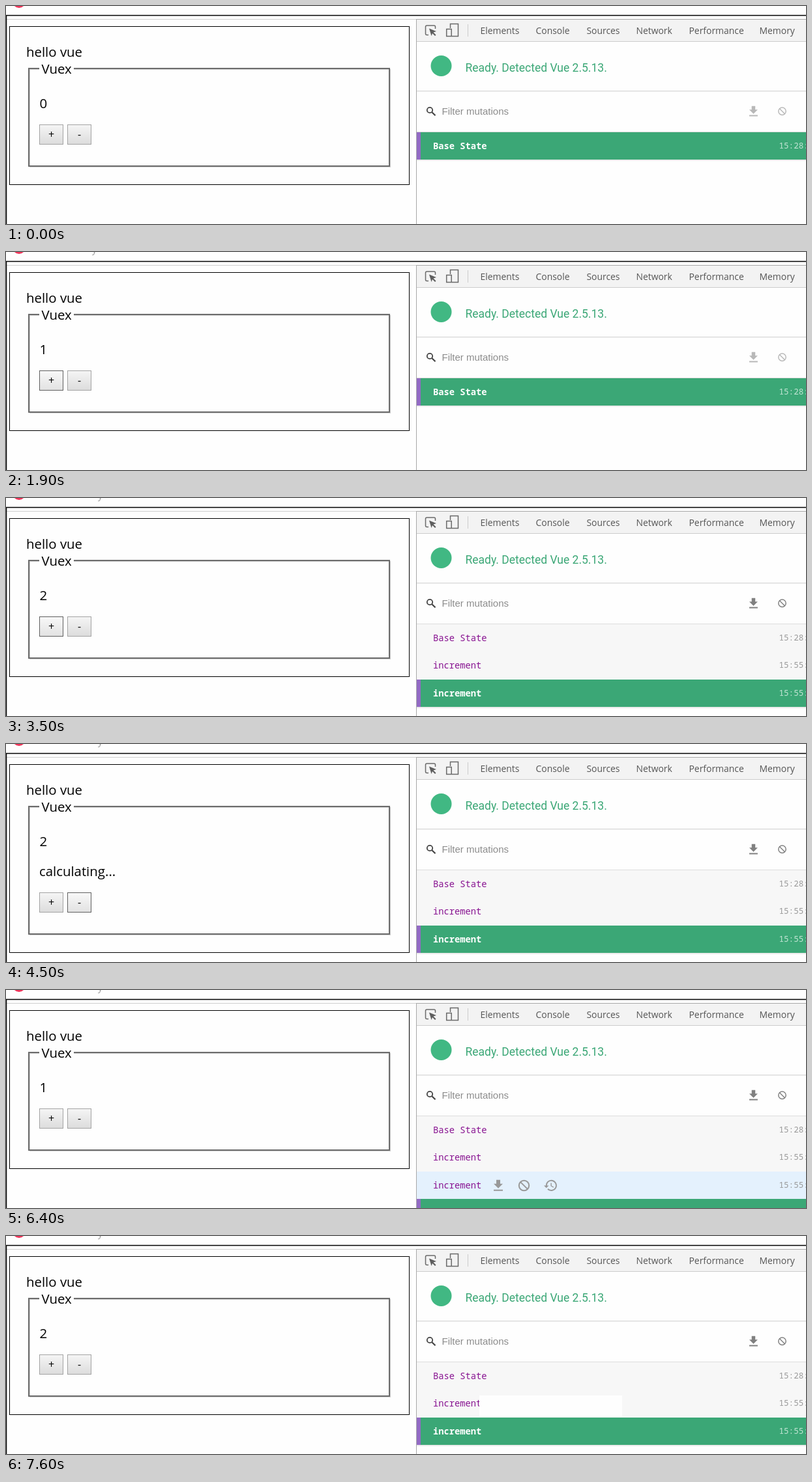
Recreate the animation shown at these times as an HTML page. Size 1227x335 px, loop 8 s.

```html
<!DOCTYPE html>
<html lang="en">
<head>
<meta charset="utf-8">
<title>Vuex counter with devtools</title>
<style>
  html, body { margin: 0; width: 100%; height: 100%; overflow: hidden; background: #fefefe; }
  svg { display: block; }
  text { white-space: pre; }
  .page text { font: 20.4px "Open Sans", sans-serif; }
  .button rect { fill: url(#face); stroke: #a3a3a3; }
  .button.hover rect { fill: url(#lit); stroke: #606060; }
  .button.down rect { fill: #dcdcdc; }
  .page .button text { font-size: 16px; text-anchor: middle; }
  .tabs { font: 13.9px "Open Sans", sans-serif; fill: #555; }
  .row .bg { fill: #f7f7f7; }
  .row .mark, .row .shade { visibility: hidden; }
  .row text { font: 13.75px "Noto Sans Mono", monospace; fill: #881391; }
  .row .time { font-size: 12.6px; fill: #999; }
  .row .tools { visibility: hidden; color: #999; }
  .row.hover .bg { fill: #e4f1fd; }
  .row.hover .tools { visibility: visible; }
  .row.active .bg { fill: #3ba776; }
  .row.active .mark, .row.active .shade { visibility: visible; }
  .row.active text { fill: #fff; }
  .row.active .name { font-weight: 600; }
  .row.active .time { fill: #c5e5d6; }
  .row.active .tools { color: #b4dfcb; }
</style>
</head>
<body>
<svg width="1227" height="335" viewBox="0 0 1227 335">
  <defs>
    <linearGradient id="face" x2="0" y2="1"><stop stop-color="#f5f5f5"/><stop offset="1" stop-color="#dcdcdc"/></linearGradient>
    <linearGradient id="lit" x2="0" y2="1"><stop stop-color="#f8f8f8"/><stop offset="1" stop-color="#e2e2e2"/></linearGradient>
    <path id="save" fill="currentColor" d="M19 9h-4V3H9v6H5l7 7 7-7zM5 18v2h14v-2z"/>
    <g id="ban" fill="none" stroke="currentColor" stroke-width="2"><circle r="7.7"/><path d="M-5.4-5.4 5.4 5.4"/></g>
    <path id="history" fill="currentColor" d="M13 3a9 9 0 0 0-9 9H1l4 4 4-4H6a7 7 0 1 1 2.06 4.94l-1.42 1.42A9 9 0 1 0 13 3zm-1 5v5l4.28 2.54.72-1.21-3.5-2.08V8z"/>
  </defs>

  <circle cx="20" cy="-7" r="10" fill="#f0355a"/>
  <text id="title" y="1" font-family="Open Sans, sans-serif" font-size="14" fill="#999">y</text>
  <path d="M0 20.5H629" stroke="#d0d0d0"/>
  <path d="M0 14.5H1227M.5 14V335" stroke="#000" stroke-width="1.5" fill="none"/>

  <g class="page">
    <rect id="frame" x="5.5" y="31.5" width="613" fill="none" stroke="#000"/>
    <rect id="light" x="36.5" y="97.5" width="553" fill="none" stroke="#cfcfcf"/>
    <rect id="fieldset" x="35" y="96" width="553" fill="none" stroke="#6c6c6c" stroke-width="2"/>
    <rect x="51" y="93" width="53" height="8" fill="#fefefe"/>
    <text x="31" y="78">hello vue</text>
    <text x="54.5" y="104">Vuex</text>
    <text id="count" x="51.5" y="157"></text>
    <text id="busy" x="51" y="203">calculating...</text>
    <g id="buttons">
      <g class="button" id="plus"><rect x="51.5" y="182.5" width="36" height="30"/><text x="69.5" y="203">+</text></g>
      <g class="button" id="minus"><rect x="94.5" y="182.5" width="36" height="30"/><text x="112.5" y="203">-</text></g>
    </g>
  </g>

  <g id="devtools">
    <rect x="630" y="21" width="597" height="33" fill="#f3f3f3"/>
    <path d="M629.5 20V335M629 20.5H1227" stroke="#a8a8a8" fill="none"/>
    <path d="M630 54.5H1227M708.5 28V47" stroke="#ccc" fill="none"/>
    <g fill="none" stroke="#6a6a6a" stroke-width="1.5">
      <path d="M648 44.5H645.5Q643.5 44.5 643.5 42.5V32Q643.5 30 645.5 30H656.500Q658.500 30 658.500 32V35"/>
      <path d="M681.500 34V27.500H693.500V46.500H684"/>
      <rect x="675.700" y="35.500" width="7.500" height="11"/>
    </g>
    <path d="M649 34.500 660 39 655.500 40.500 659.500 44.500 658 46 654 42 652.500 46z" fill="#5e5e5e"/>
    <g class="tabs">
      <text x="727.5" y="43">Elements</text>
      <text x="812.5" y="43">Console</text>
      <text x="890.5" y="43">Sources</text>
      <text x="966.5" y="43">Network</text>
      <text x="1047.500" y="43">Performance</text>
      <text x="1155.500" y="43">Memory</text>
    </g>
    <circle cx="667.5" cy="92" r="16" fill="#41b883"/>
    <text x="704.500" y="101" font-family="Roboto, sans-serif" font-size="17.500" fill="#3ba776">Ready. Detected Vue 2.5.13.</text>
    <path d="M630 130.500H1227" stroke="#dadada"/>
    <path d="M630 131.500H1227" stroke="#f0f0f0"/>
    <g fill="none" stroke="#444" stroke-width="1.800"><circle cx="650" cy="160" r="4.200"/><path d="M653.300 163.300 658.500 168.300" stroke-width="2.200"/></g>
    <text x="668.500" y="167" font-family="Liberation Sans, Arial, sans-serif" font-size="15" fill="#8c8c8c">Filter mutations</text>
    <g id="actions">
      <use href="#save" transform="translate(1135.400 151) scale(.92)"/>
      <use href="#ban" transform="translate(1190.500 161.700) scale(.74)"/>
    </g>
    <path d="M630 193.500H1227" stroke="#dcdcdc"/>
    <g id="rows"></g>
    <rect id="tip" x="726" y="245" width="219" height="32" fill="#fefefe"/>
  </g>
</svg>
<script>
const LOOP = 8000;
const $ = id => document.getElementById(id);
const tops = [194, 236, 279, 321, 364];

$('rows').innerHTML = ['Base State', 'increment', 'increment', 'decrement'].map((name, i) => `
  <g class="row" transform="translate(0 ${tops[i]})">
    <rect class="bg" x="630" width="597" height="${tops[i + 1] - tops[i]}"/>
    <rect class="mark" x="630" width="6" height="${tops[i + 1] - tops[i]}" fill="#926bc4"/>
    <rect class="shade" x="630" y="${tops[i + 1] - tops[i]}" width="597" height="2" fill="#ececec"/>
    <text class="name" x="655" y="26">${name}</text>
    <text class="time" x="1185.500" y="25">${i ? '15:55:' : '15:28:'}</text>
    <g class="tools">
      <use href="#save" x="743" y="9.700"/>
      <use href="#ban" x="794.500" y="21.500"/>
      <use class="travel" href="#history" transform="translate(824 10) scale(.95)"/>
    </g>
  </g>`).join('');
const rows = [...document.querySelectorAll('.row')];

// Value of the last [time, value] step that has been reached.
const at = (t, steps) => steps.reduce((value, [start, next]) => t >= start ? next : value, null);
const within = (t, from, to) => t >= from && t < to;
const show = (el, on) => el.style.display = on ? '' : 'none';

function render(t) {
  const busy = within(t, 1400, 1900) || within(t, 2900, 3500) || within(t, 4500, 5000);
  const grow = busy ? 46 : 0;
  $('count').textContent = at(t, [[0, 0], [1900, 1], [3500, 2], [5000, 1], [7400, 2]]);
  show($('busy'), busy);
  $('frame').setAttribute('height', 243 + grow);
  $('fieldset').setAttribute('height', 150 + grow);
  $('light').setAttribute('height', 150 + grow);
  $('buttons').setAttribute('transform', `translate(0 ${grow})`);

  $('plus').classList.toggle('hover', within(t, 1000, 3900));
  $('plus').classList.toggle('down', within(t, 1300, 1400) || within(t, 2800, 2900));
  $('minus').classList.toggle('hover', within(t, 4000, 5400));
  $('minus').classList.toggle('down', within(t, 4400, 4500));

  show($('title'), t >= 100);
  $('title').setAttribute('x', t < 2800 ? 132 : 141);

  const total = at(t, [[0, 1], [2000, 2], [3500, 3], [5100, 4]]);
  const active = t < 7400 ? total - 1 : 2;
  const hover = at(t, [[0, -1], [6000, 3], [6400, 2], [7400, -1]]);
  rows.forEach((row, i) => {
    show(row, i < total && !(i === 3 && t >= 7400));
    row.classList.toggle('active', i === active);
    row.classList.toggle('hover', i === hover);
  });
  rows[2].querySelector('.travel').style.color = t >= 6800 ? '#555' : '';
  $('actions').setAttribute('color', at(t, [[0, '#b8b8b8'], [2000, '#a0a0a0'], [2100, '#8c8c8c'], [2200, '#808080']]));
  show($('tip'), t >= 7300);
}

function tick() {
  render(performance.now() % LOOP);
  requestAnimationFrame(tick);
}
tick();
</script>
</body>
</html>
```
